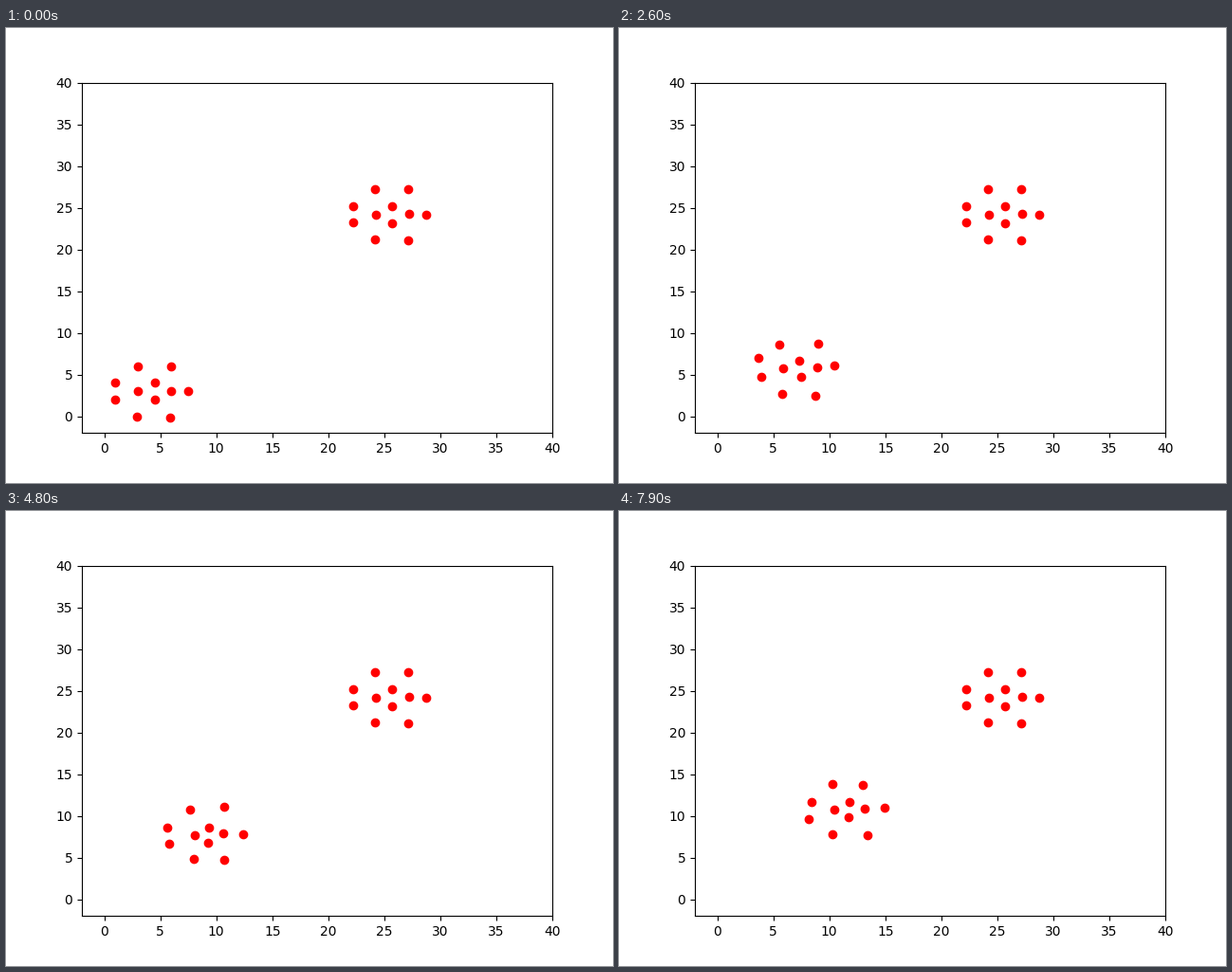
Write a matplotlib script that moves like this. It is 640 px wide and 480 px high and loops after 8000 ms.

```python
import matplotlib.pyplot as plt
import numpy as np
from matplotlib.animation import FuncAnimation

FRAMES, INTERVAL = 80, 100
PULL, KICK = 0.08, 0.06           # how the dots wander about their places

# One flock; the resting one is a shifted copy.
FLOCK = np.array([
    (1, 4), (1, 2), (3, 6), (3.03, 3), (2.94, 0), (4.5, 4),
    (4.5, 1.97), (5.96, 6), (6, 3.03), (5.9, -0.12), (7.5, 3)])
SHIFT = 21.2

# Step and offset of the moving flock's centre along its path.
PATH = np.array([(0, 0, 0), (26, 2.85, 2.77), (39, 3.95, 3.86),
                 (66, 6.52, 6.62), (79, 7.31, 7.78)])


def centre(step):
    steps, xs, ys = PATH.T
    return np.array([np.interp(step, steps, xs), np.interp(step, steps, ys)])


def wander():
    """Seeded random walk of every dot, drawn back to its place."""
    rng = np.random.default_rng(4)
    walk = np.zeros((FRAMES, *FLOCK.shape))
    for step in range(1, FRAMES):
        kick = rng.normal(0, KICK, FLOCK.shape)
        walk[step] = (1 - PULL) * walk[step - 1] + kick
    return walk - walk.mean(axis=1, keepdims=True)


walk = wander()

fig, ax = plt.subplots(figsize=(6.4, 4.8), dpi=100)
ax.set(xlim=(-2, 40), ylim=(-2, 40))
ax.plot(*(FLOCK + SHIFT).T, "ro")
dots, = ax.plot([], [], "ro")


def update(step):
    dots.set_data(*(FLOCK + centre(step) + walk[step]).T)
    return dots,


anim = FuncAnimation(fig, update, frames=FRAMES, interval=INTERVAL,
                     repeat=True, repeat_delay=0)
plt.show()
```
